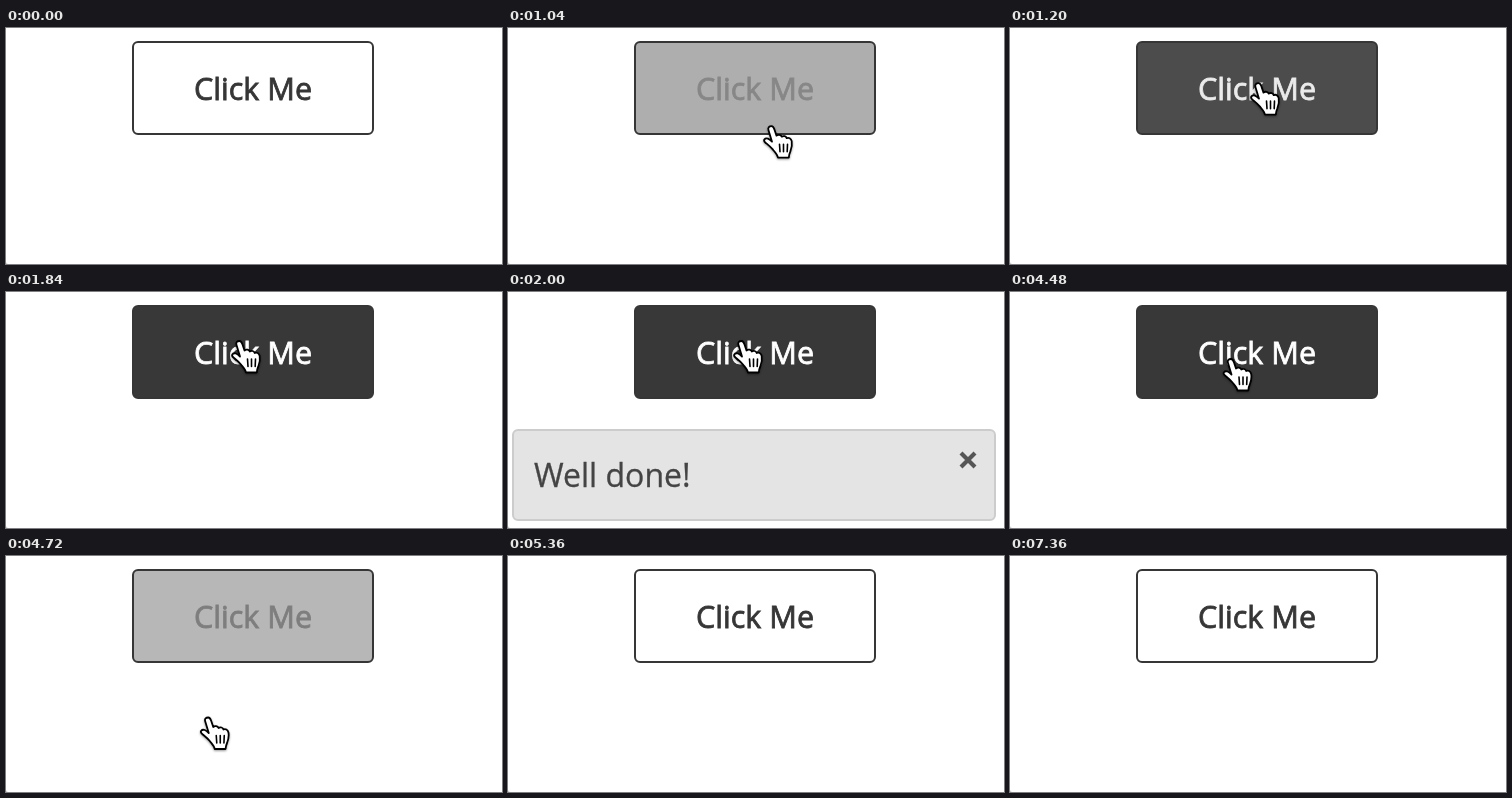
These frames come from a looping animation (496x236 px, 7440 ms). An HTML page:

```html
<!DOCTYPE html>
<html lang="en">
<head>
<meta charset="utf-8">
<title>Button message</title>
<style>
  html, body { margin: 0; width: 100%; height: 100%; overflow: hidden; background: #fff; }
  svg { display: block; width: 496px; height: 236px; }
  text { font-family: "Open Sans", sans-serif; }
</style>
</head>
<body>
<svg viewBox="0 0 496 236">
  <path d="M0 234Q.5 235.5 2 236H0Z" fill="#ccc"/>
  <rect id="button" x="127" y="14" width="240" height="92" rx="5" stroke="#363636" stroke-width="2"/>
  <text id="label" x="247" y="72" font-size="30.6" text-anchor="middle" stroke-width=".8">Click Me</text>
  <g id="message">
    <rect x="5" y="138" width="482" height="90" rx="5" fill="#e4e4e4" stroke="#ccc" stroke-width="2"/>
    <text x="26" y="195" font-size="32" fill="#444" stroke="#444" stroke-width=".3">Well done!</text>
    <path d="M453 161L467 175M467 161L453 175" stroke="#555" stroke-width="4.2"/>
  </g>
  <g id="hand" stroke-linejoin="round" stroke-linecap="round">
    <path id="palm" d="M-3 3C-4 0-2-1 0-1C2-1 2.500 1 3 2.500L5 8.500C6.500 7 9.500 7.500 10.300 9.500C12 8.200 14.600 9 15.200 11C17 10 19.600 11 20.200 14C21 18.500 20 21.500 18.800 24.500C17.600 27 17.500 28 17.300 30.500H6.500C6 27.500 3.600 25.200 1.500 22.500C-1 19.500-3 18-6 15.500C-9 13-6.500 10.500-3.500 11.500C-1.800 12.200-.6 13.400.5 14.500Z"
      fill="#fff" stroke="#000" stroke-width="1.800"/>
    <path d="M8 17L8.500 24.500M12 17V24.500M16 17L15.700 24.500" fill="none" stroke="#000" stroke-width="1.600"/>
  </g>
</svg>
<script>
const LOOP = 7440, STEP = 80, GLIDE = 480;
const ENTER = 880, LEAVE = 4320;
const REST = { x: 233.5, y: 50 };
const [button, label, message, hand, palm] =
  ["button", "label", "message", "hand", "palm"].map(id => document.getElementById(id));
palm.style.filter = "drop-shadow(0 1px 1px rgba(0,0,0,.4))";

const ramp = (t, from, to) => Math.min(1, Math.max(0, (t - from) / (to - from)));
const easeOut = p => 1 - (1 - p) ** 2;
const mix = (a, b, p) => a + (b - a) * p;
const grey = v => `rgb(${Array(3).fill(Math.round(v))})`;

// The hand slows down as it arrives and speeds up as it leaves.
function pointer(t) {
  const still = 1 - ramp(t, ENTER, ENTER + GLIDE);
  const away = Math.max(0, (t - LEAVE) / GLIDE);
  return {
    x: REST.x + 45 * still - 37.5 * away,
    y: REST.y + 166 * still ** 3 + 162 * away ** 2
  };
}

function draw(t) {
  const hover = easeOut(ramp(t, 960, 1310)) - easeOut(ramp(t, 4560, 4960));
  const ink = grey(mix(54, 255, hover));
  button.setAttribute("fill", grey(mix(255, 56, hover)));
  label.setAttribute("fill", ink);
  label.setAttribute("stroke", ink);

  message.setAttribute("opacity", t < 2000 ? 0 : 1 - ramp(t, 3080, 3320));

  const { x, y } = pointer(t);
  hand.setAttribute("visibility", t < ENTER ? "hidden" : "visible");
  hand.setAttribute("transform", `translate(${x} ${y})`);
}

function tick() {
  draw(Math.floor(performance.now() % LOOP / STEP) * STEP);
  requestAnimationFrame(tick);
}
tick();
</script>
</body>
</html>
```
